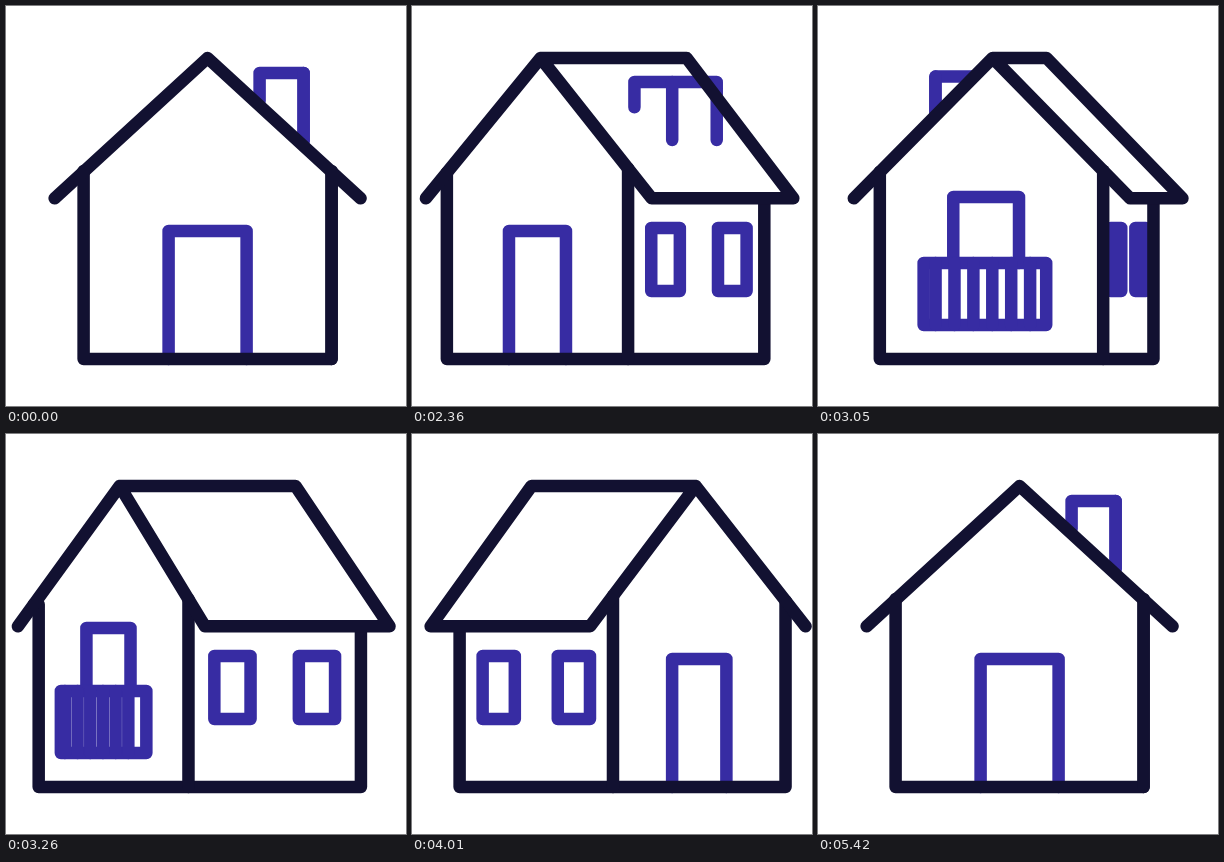
An HTML page with a canvas that plays this animation: 400 by 400 pixels, repeating every 5450 ms.

```html
<!DOCTYPE html>
<html lang="en">
<head>
<meta charset="utf-8">
<title>Turning house</title>
<style>
  html, body { margin: 0; width: 100%; height: 100%; overflow: hidden; background: #fff; }
  canvas { display: block; width: 400px; height: 400px; }
</style>
</head>
<body>
<canvas id="stage" width="400" height="400"></canvas>
<script>
const ctx = document.getElementById('stage').getContext('2d');
const DARK = '#121131', BLUE = '#372ca3';
const LOOP = 5450, START = 2025, TURN = 3385;
const CX = 201.6, RIDGE_Y = 52, EAVE_Y = 192.3, BASE_Y = 353;

// Distances from the centre: gable view, corner view, long side view.
const SHAPE = {
  out: [124, 172, 149],
  mid: [124, 1, -149],
  side: [124, 154, 149],
  ridge: [0, 82, 126],
  eaveOut: [153, 192, 175],
  eaveMid: [153, 24, -175],
  eaveSide: [153, 183, 175],
  wallTop: [165, 167, 192]
};

// Chimney per quarter turn: three x values, top, three bottom values.
const CHIMNEY = [
  [[52, 96, 96, 67, 95, 135, 135], [17, 54, 104, 77, 102, 134, 134], [-34, -34, 18, 84, 110, 137, 137]],
  [[-34, 18, 18, 84, 137, 137, 110], [-104, -54, -17, 77, 134, 134, 102], [-96, -96, -52, 67, 135, 135, 95]],
  [[-96, -96, -52, 67, 135, 135, 95], [-60, -60, -10, 78, 135, 135, 110], [-20, -20, 20, 95, 135, 135, 135]],
  [[-20, 20, 20, 95, 135, 135, 135], [10, 66, 66, 82, 110, 135, 135], [52, 96, 96, 67, 95, 135, 135]]
];

const lerp = (a, b, p) => a + (b - a) * p;
const track = (keys, a) => a < 1 ? lerp(keys[0], keys[1], a) : lerp(keys[1], keys[2], a - 1);

function bezier(x1, y1, x2, y2) {
  const at = (a, b, s) => 3 * a * s * (1 - s) ** 2 + 3 * b * s * s * (1 - s) + s ** 3;
  return x => {
    if (x <= 0) return 0;
    if (x >= 1) return 1;
    let lo = 0, hi = 1;
    for (let i = 0; i < 30; i++) {
      const s = (lo + hi) / 2;
      if (at(x1, x2, s) < x) lo = s; else hi = s;
    }
    return at(y1, y2, lo);
  };
}
const ease = bezier(0.191, 0.05, 0.251, 1);

function trace(points) {
  ctx.beginPath();
  points.forEach(([x, y]) => ctx.lineTo(x, y));
}
function line(color, ...points) {
  trace(points);
  ctx.strokeStyle = color;
  ctx.stroke();
}
function box(x1, y1, x2, y2) {
  line(BLUE, [x1, y1], [x2, y1], [x2, y2], [x1, y2], [x1, y1], [x2, y1]);
}
function frameDoor(cx, half, top, bottom) {
  line(BLUE, [cx - half, bottom], [cx - half, top], [cx + half, top], [cx + half, bottom]);
}

function drawChimney(quarter, r) {
  const keys = CHIMNEY[quarter];
  const [l, m, e, top, lb, mb, eb] = keys[0].map((_, i) => track(keys.map(k => k[i]), r));
  line(BLUE, [CX + l, lb], [CX + l, top], [CX + e, top], [CX + e, eb]);
  line(BLUE, [CX + m, top], [CX + m, mb]);
}

function drawBalcony(center, g, flip) {
  const sway = Math.sqrt(Math.max(0, 1 - g * g));
  const cx = center - 2 * g - flip * 11 * sway;
  const half = 67.5 * g + 5 * (1 - g);
  frameDoor(center - 4.5 * g - flip * 3 * sway, 36.5 * g, 190 + 10 * (1 - g), 257);
  box(cx - half, 257, cx + half, 319);
  const barX = cx - flip * 11 * sway * sway;
  for (let i = -2.5; i <= 2.5; i++) {
    const x = Math.max(cx - half, Math.min(cx + half, barX + i * 21 * g));
    line(BLUE, [x, 257], [x, 319]);
  }
}

function draw(pos) {
  const quarter = Math.min(3, Math.floor(pos / 2));
  const r = pos - quarter * 2;
  const flip = quarter % 2 ? -1 : 1;
  const a = flip > 0 ? r : 2 - r;
  const h = {};
  for (const name in SHAPE) h[name] = track(SHAPE[name], a);

  const X = v => CX + flip * v;
  const out = X(-h.out), mid = X(h.mid), side = X(h.side);
  const apex = [X(-h.ridge), RIDGE_Y], far = [X(h.ridge), RIDGE_Y];
  const eaveOut = [X(-h.eaveOut), EAVE_Y];
  const eaveMid = [X(h.eaveMid), EAVE_Y];
  const eaveSide = [X(h.eaveSide), EAVE_Y];
  const center = (out + mid) / 2;
  const g = (h.out + h.mid) / 248;
  const backSeen = quarter === 1 || quarter === 2;

  ctx.fillStyle = '#fff';
  ctx.fillRect(0, 0, 400, 400);
  ctx.lineWidth = 12.5;
  ctx.lineCap = ctx.lineJoin = 'round';

  drawChimney(quarter, r);
  if (pos > 4) {
    trace([eaveOut, apex, far, eaveSide]);
    ctx.fill();
  }

  if (a > 0.02) {
    const shift = quarter < 2 ? 0.02 : 0;
    const at = f => lerp(mid, side, f + shift);
    box(at(0.15), 222, at(0.36), 285);
    box(at(0.64), 222, at(0.85), 285);
  }
  if (!backSeen) {
    if (g > 0.01) frameDoor(center, 39 * g, 225, BASE_Y);
    const reach = 16 * Math.sqrt(Math.max(0, 1 - g * g)) - 58 * g;
    if (reach > 0) box(side, 257, side + flip * reach, 319);
  }

  // Outer walls and floor, with the gable wall reaching to the roof slope.
  const slope = h.ridge + (h.eaveOut - h.ridge) * (h.wallTop - RIDGE_Y) / (EAVE_Y - RIDGE_Y);
  const sideTop = lerp(165, EAVE_Y, Math.min(1, a * 4));
  line(DARK, [X(-slope), h.wallTop], [out, h.wallTop], [out, BASE_Y], [side, BASE_Y], [side, sideTop]);

  if (backSeen) drawBalcony(center, g, flip);

  // Corner between the gable and the long side.
  const rise = (h.mid + h.ridge) / (h.eaveMid + h.ridge);
  const under = h.eaveMid > h.mid && h.mid > -h.ridge;
  const midTop = under ? lerp(RIDGE_Y, EAVE_Y, rise) : EAVE_Y;
  line(DARK, [mid, midTop], [mid, BASE_Y]);

  line(DARK, eaveOut, apex, eaveMid, eaveSide, far, apex);
}

function tick() {
  const t = performance.now() % LOOP;
  draw(ease((t - START) / TURN) * 8 % 8);
  requestAnimationFrame(tick);
}
tick();
</script>
</body>
</html>
```
